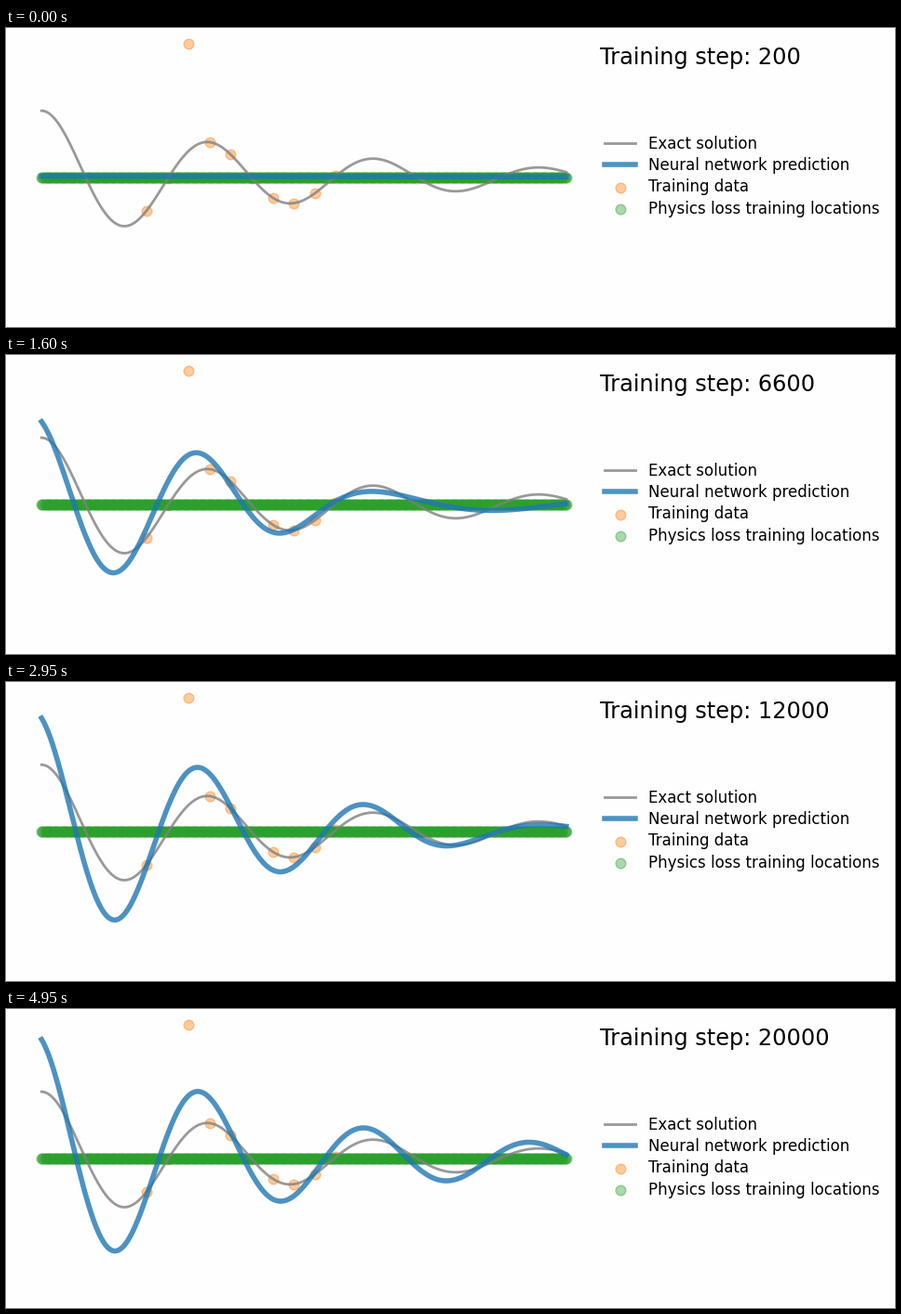
Animation, 955 px wide and 322 px high, one loop 5000 ms. Source, as a matplotlib script:

```python
import numpy as np
import matplotlib.pyplot as plt
from matplotlib.animation import FuncAnimation

WIDTH, HEIGHT, DPI = 955, 322, 100
FRAMES, INTERVAL = 100, 50
STEPS_PER_FRAME = 200
DAMPING, OMEGA = 2, 20
FREQUENCY = np.sqrt(OMEGA**2 - DAMPING**2)

plt.rcParams["font.family"] = "DejaVu Sans"
x = np.linspace(0, 1, 500)


def logistic(z):
    return 1 / (1 + np.exp(-z))


def softplus(z):
    return np.logaddexp(0, z)


def damped_wave(envelope, phase):
    """Wave whose extremes lie where the phase is a multiple of pi."""
    shift = np.arctan(np.gradient(np.log(envelope), x) / np.gradient(phase, x))
    return envelope * np.cos(phase + shift) / np.cos(shift)


def growth(frame):
    """Fast onset of the fit followed by slow convergence."""
    onset = logistic((frame - 24.5) / 3.2)
    convergence = 1 - np.exp(-max(frame - 20, 0) / 28)
    return 0.78 * onset + 0.23 * convergence


def prediction(frame):
    grown = growth(frame)
    since = max(frame - 25, 0)

    # The outlier lifts the wave on its left; the far left and right lag behind
    level = 1.705 - 0.135 * np.tanh((x - 0.39) / 0.06)
    lag = 0.45 * np.exp(-since / 5)
    left = 1 - lag * np.exp(-(x / 0.2) ** 2)
    reach = 0.53 + 0.0002 * since**2
    right = 0.4 + 0.6 * logistic((reach - x) / 0.08)
    envelope = grown * level * left * right * np.exp(-DAMPING * x)

    # Oscillations stay too slow beyond a front that moves right
    front = 0.52 + 0.0105 * since
    delay = (5.5 + 11 * lag) * 0.05 * softplus((x - front) / 0.05)
    lead = 0.015 * (1 - grown)
    phase = np.pi + FREQUENCY * (x - 0.14 + lead) - delay

    bias = (1 - grown) * (0.02 - 0.01 * x)
    return damped_wave(envelope, phase) + bias


exact = damped_wave(np.exp(-DAMPING * x), FREQUENCY * x)
x_data, y_data = x[100:300:20], exact[100:300:20].copy()
y_data[2] = 2  # outlier

fig = plt.figure(figsize=(WIDTH / DPI, HEIGHT / DPI), dpi=DPI, facecolor="#fefefe")
ax = fig.add_axes([10 / WIDTH, 10 / HEIGHT, 620 / WIDTH, 302 / HEIGHT])
ax.set(xlim=(-0.05, 1.05), ylim=(-2.1, 2.1))
ax.axis("off")

ax.plot(x, exact, color="grey", lw=2, alpha=0.8, label="Exact solution")
fit, = ax.plot(x, prediction(0), color="tab:blue", lw=4, alpha=0.8,
               label="Neural network prediction")
ax.scatter(x_data, y_data, s=60, color="tab:orange", alpha=0.4,
           label="Training data")
ax.scatter(x, 0 * x, s=60, color="tab:green", alpha=0.4,
           label="Physics loss training locations")
ax.legend(loc=(1.01, 0.337), frameon=False, fontsize="large",
          labelspacing=0.32, labelcolor="black")
title = ax.text(1.065, 1.7, "", fontsize="xx-large", color="black")


def update(frame):
    fit.set_ydata(prediction(frame))
    title.set_text(f"Training step: {(frame + 1) * STEPS_PER_FRAME}")
    return fit, title


anim = FuncAnimation(fig, update, frames=FRAMES, interval=INTERVAL, repeat=True)
plt.show()
```
